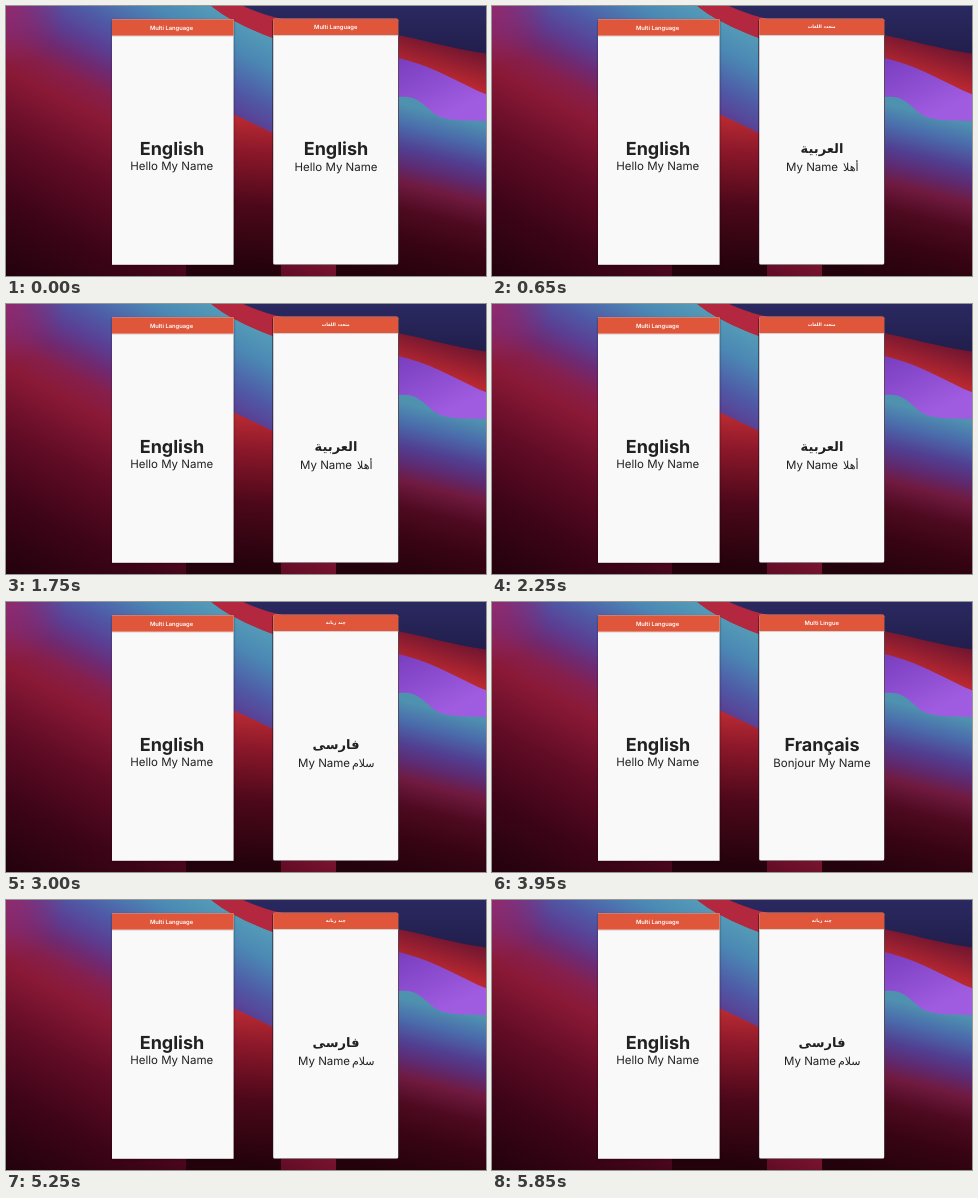
These frames come from a looping animation (480x270 px, 5.9 s). An HTML page:

```html
<!DOCTYPE html>
<html lang="en">
<head>
<meta charset="utf-8">
<style>
html, body { margin: 0; width: 100%; height: 100%; overflow: hidden; background: #22020c }
svg { display: block; width: 480px; height: 270px }
text { font-family: Inter, "Noto Sans", "DejaVu Sans", sans-serif; fill: #212121; text-anchor: middle; text-rendering: geometricPrecision }
.bar { font-size: 5.8px; font-weight: 600; fill: #fff }
.name { font-size: 18px; font-weight: 700 }
.hello { font-size: 11.5px }
.rtl { direction: rtl; font-family: "DejaVu Sans", sans-serif }
.rtl.bar { font-size: 4.6px }
.rtl.name { font-size: 13px }
.rtl.hello { font-size: 11px; text-anchor: start }
.latin { text-anchor: start }
</style>
</head>
<body>
<svg viewBox="0 0 480 270">
  <defs>
    <linearGradient id="slope" gradientUnits="userSpaceOnUse" x1="46" y1="-89" x2="-110" y2="214">
      <stop offset="0" stop-color="#56a0b8"/><stop offset=".1" stop-color="#4b88b4"/>
      <stop offset=".2" stop-color="#4f5aa6"/><stop offset=".27" stop-color="#5a3f94"/>
      <stop offset=".33" stop-color="#6e2a72"/><stop offset=".39" stop-color="#861f4c"/>
      <stop offset=".46" stop-color="#8a1936"/><stop offset=".62" stop-color="#620c26"/>
      <stop offset=".8" stop-color="#3e0418"/><stop offset="1" stop-color="#22020c"/>
    </linearGradient>
    <radialGradient id="glow" gradientUnits="userSpaceOnUse" cx="0" cy="0" r="60">
      <stop offset="0" stop-color="#92296c"/><stop offset="1" stop-color="#92296c" stop-opacity="0"/>
    </radialGradient>
    <linearGradient id="hill" gradientUnits="userSpaceOnUse" x1="250" y1="112" x2="240" y2="262">
      <stop offset="0" stop-color="#b82a32"/><stop offset=".22" stop-color="#8c182a"/>
      <stop offset=".58" stop-color="#4c081a"/><stop offset="1" stop-color="#24020c"/>
    </linearGradient>
    <linearGradient id="lagoon" gradientUnits="userSpaceOnUse" x1="393" y1="97" x2="352" y2="262">
      <stop offset="0" stop-color="#4f92b0"/><stop offset=".12" stop-color="#4a6cab"/>
      <stop offset=".25" stop-color="#513f92"/><stop offset=".35" stop-color="#5e2a70"/>
      <stop offset=".45" stop-color="#701a40"/><stop offset=".6" stop-color="#4e0a20"/>
      <stop offset=".78" stop-color="#380414"/><stop offset="1" stop-color="#24020c"/>
    </linearGradient>
    <linearGradient id="violet" gradientUnits="userSpaceOnUse" x1="400" y1="52" x2="430" y2="114">
      <stop offset="0" stop-color="#7a3fc0"/><stop offset="1" stop-color="#a05ce0"/>
    </linearGradient>
    <linearGradient id="wave" gradientUnits="userSpaceOnUse" x1="440" y1="36" x2="430" y2="70">
      <stop offset="0" stop-color="#701530"/><stop offset="1" stop-color="#b82830"/>
    </linearGradient>
    <linearGradient id="navy" x2="0" y2="1">
      <stop offset="0" stop-color="#2b2a62"/><stop offset="1" stop-color="#211e4c"/>
    </linearGradient>
    <filter id="soft"><feGaussianBlur stdDeviation=".6"/></filter>
    <filter id="shade" x="-10%" width="120%"><feGaussianBlur stdDeviation="1"/></filter>
  </defs>

  <rect width="480" height="270" fill="url(#slope)"/>
  <rect width="60" height="60" fill="url(#glow)"/>
  <g filter="url(#soft)">
    <path d="M180 86C215 102 240 114 275 131V280H180Z" fill="url(#hill)"/>
    <rect x="330" y="60" width="160" height="220" fill="url(#lagoon)"/>
    <path d="M330 40H490V115C445 115 434 114 424 104C415 96 408 89 393 91L330 95Z" fill="url(#violet)"/>
    <path d="M200-5C212 8 240 22 267 32C320 48 370 46 400 54C435 63 460 82 490 92V-5Z" fill="url(#wave)"/>
    <path d="M200-5C212 8 240 22 267 32L300 42V-5Z" fill="#b3283f"/>
    <path d="M228-5C262 15 310 20 350 23C400 27 430 41 490 49V-5Z" fill="url(#navy)"/>
  </g>

  <g id="phones">
    <rect x="106" y="14" width="122" height="245.3" opacity=".4" filter="url(#shade)"/>
    <rect x="106" y="13.4" width="121.6" height="245.4" fill="#f9f9f9"/>
    <rect x="106" y="29.5" width="121.6" height="1" fill="#d5cbc9"/>
    <rect x="106" y="13.4" width="121.6" height="16.2" fill="#e0563a"/>
    <rect x="266.5" y="13" width="126.3" height="246" rx="2" fill="#210e19"/>
    <rect x="267.2" y="12.8" width="125" height="245.7" rx="1.5" fill="#f9f9f9"/>
    <rect x="267.2" y="28.9" width="125" height="1" fill="#d5cbc9"/>
    <rect x="267.2" y="12.8" width="125" height="16.2" fill="#e0563a"/>
  </g>

  <text class="bar" x="165.5" y="23.8">Multi Language</text>
  <text class="name" x="166" y="149">English</text>
  <text class="hello" x="165.7" y="164.2">Hello My Name</text>
  <g id="screen"></g>
</svg>
<script>
const LOOP = 5900;
const languages = {
  en: { bar: "Multi Language", name: "English", hello: "Hello" },
  ar: { bar: "متعدد اللغات", name: "العربية", hello: "أهلا", left: 294, right: 366.5 },
  fa: { bar: "چند زبانه", name: "فارسی", hello: "سلام", left: 292, right: 368.5 },
  fr: { bar: "Multi Lingue", name: "Français", hello: "Bonjour" }
};
const schedule = [[0, "en"], [600, "ar"], [2600, "fa"], [3450, "fr"], [4300, "ar"], [5200, "fa"]];
const screen = document.getElementById("screen");
let shown;

const label = (kind, x, y, words) => `<text class="${kind}" x="${x}" y="${y}">${words}</text>`;

function draw(code) {
  const { bar, name, hello, left, right } = languages[code];
  const dir = left ? "rtl " : "";
  screen.innerHTML =
    label(dir + "bar", 329.7, left ? 22.4 : 23, bar) +
    label(dir + "name", 330, left ? 146.5 : 149, name) +
    (left
      ? label("hello latin", left, 165.4, "My Name") + label(dir + "hello", right, 165.2, hello)
      : label("hello", 330, 164.5, hello + " My Name"));
}

function tick() {
  const t = performance.now() % LOOP;
  const code = schedule.filter(([start]) => start <= t).pop()[1];
  if (code !== shown) draw(shown = code);
  requestAnimationFrame(tick);
}
tick();
</script>
</body>
</html>
```
